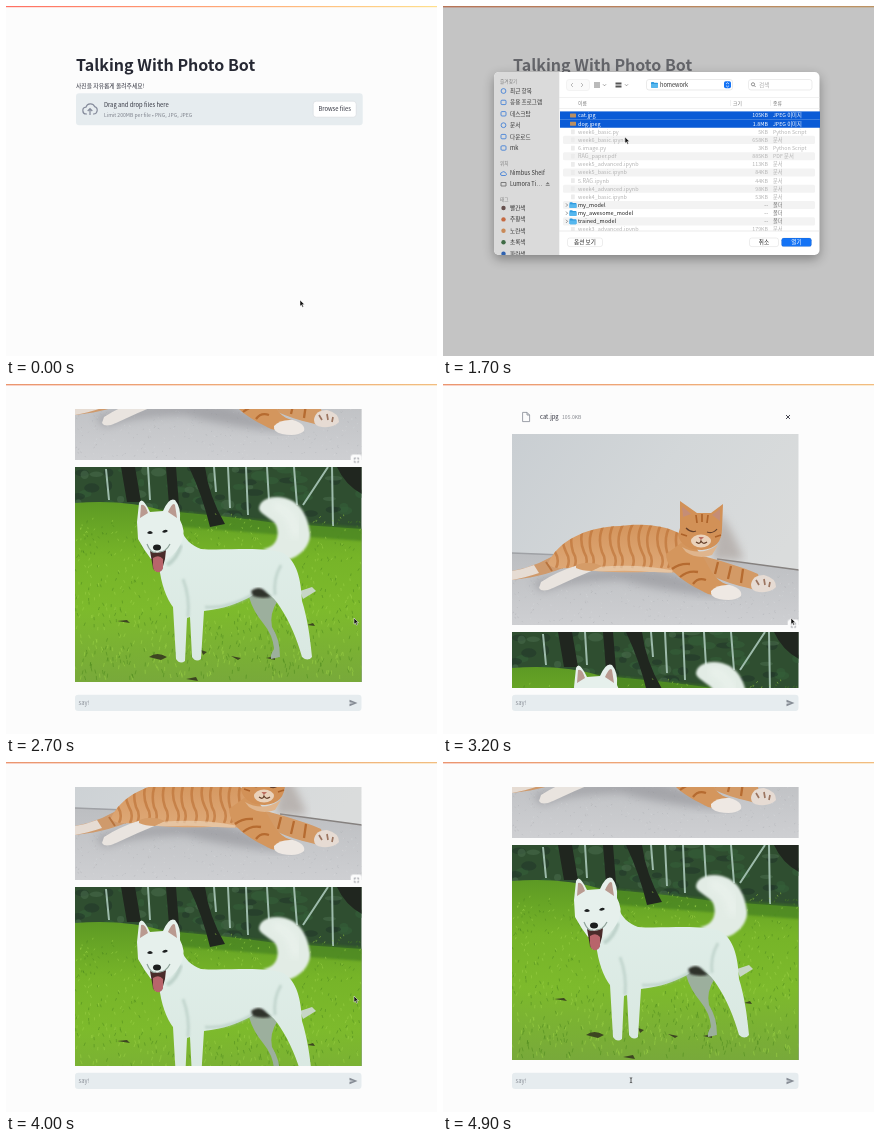
These frames come from a looping animation (431 px wide and 350 px high, 5000 ms). An HTML page:

```html
<!DOCTYPE html>
<html>
<head>
<meta charset="utf-8">
<title>Photo upload demo</title>
<style>
html, body { margin: 0; width: 100%; height: 100%; overflow: hidden; background: #fcfcfc; }
svg { display: block; width: 100%; height: 100%; }
text { font-family: "Noto Sans CJK KR", "Noto Sans CJK JP", "Open Sans", sans-serif; white-space: pre; }
.anim { animation: 5s step-end infinite; }

#page { animation-name: scroll; }
@keyframes scroll {
  0%, 48% { transform: translateY(0); }
  50% { transform: translateY(-90px); }
  52% { transform: translateY(-220px); }
  54%, 60% { transform: translateY(-282px); }
  62% { transform: translateY(-225px); }
  64% { transform: translateY(-117px); }
  66% { transform: translateY(-40px); }
  68%, 70% { transform: translateY(0); }
  72% { transform: translateY(-18px); }
  74% { transform: translateY(-55px); }
  76% { transform: translateY(-125px); }
  78% { transform: translateY(-195px); }
  80% { transform: translateY(-240px); }
  82% { transform: translateY(-264px); }
  84% { transform: translateY(-276px); }
  86%, 100% { transform: translateY(-282px); }
}

#top { animation-name: nudge; }
@keyframes nudge { 0% { transform: none; } 44%, 100% { transform: translateX(-1px); } }

#title { animation-name: pale; }
@keyframes pale { 0% { opacity: 1; } 16% { opacity: .58; } 38%, 100% { opacity: 1; } }

#browse { animation-name: hover; }
@keyframes hover {
  0% { stroke: #d5d9dd; color: #31333f; }
  12% { stroke: #ff4b4b; color: #ff4b4b; }
  16%, 100% { stroke: #d5d9dd; color: #31333f; }
}

#dialog { animation-name: dialog; }
@keyframes dialog { 0% { opacity: 0; } 16% { opacity: 1; } 38%, 100% { opacity: 0; } }
#pick1 { animation-name: pick1; }
@keyframes pick1 { 0% { opacity: 0; } 28%, 100% { opacity: 1; } }
#pick2 { animation-name: pick2; }
@keyframes pick2 { 0% { opacity: 0; } 32%, 100% { opacity: 1; } }

#files { animation-name: files; }
@keyframes files { 0% { opacity: 0; } 42%, 100% { opacity: 1; } }
.loaded { animation-name: loaded; }
@keyframes loaded { 0% { opacity: 0; } 44%, 100% { opacity: 1; } }
#warm { animation-name: warm; }
@keyframes warm { 0% { opacity: 0; } 26%, 100% { opacity: 1; } }

#zoomCat { animation-name: zoomCat; }
@keyframes zoomCat { 0% { opacity: 0; } 44% { opacity: 1; } 52% { opacity: 0; } 66% { opacity: 1; } 76%, 100% { opacity: 0; } }
#zoomDog { animation-name: zoomDog; }
@keyframes zoomDog { 0% { opacity: 0; } 52% { opacity: 1; } 66% { opacity: 0; } 76% { opacity: 1; } 92%, 100% { opacity: 0; } }

#arrow { animation-name: point, arrow; }
@keyframes point {
  0% { transform: translate(294px, 294px); animation-timing-function: steps(6); }
  12%, 22% { transform: translate(329px, 103px); animation-timing-function: steps(3); }
  28% { transform: translate(180px, 110px); }
  32% { transform: translate(181px, 118px); }
  34% { transform: translate(182px, 131px); animation-timing-function: steps(2); }
  38% { transform: translate(351px, 234px); }
  40% { transform: translate(348px, 234px); }
  86% { transform: translate(348px, 234px); animation-timing-function: steps(5); }
  96%, 100% { transform: translate(205px, 329px); }
}
@keyframes arrow { 0% { opacity: 1; } 98%, 100% { opacity: 0; } }
#beam { animation-name: beam; }
@keyframes beam { 0% { opacity: 0; } 98%, 100% { opacity: 1; } }
</style>
</head>
<body>
<svg viewBox="0 0 431 350" preserveAspectRatio="none">
  <defs>
    <linearGradient id="bar"><stop stop-color="#ff6f62"/><stop offset="1" stop-color="#ffdf8c"/></linearGradient>
    <linearGradient id="bar2"><stop stop-color="#ea966f"/><stop offset="1" stop-color="#f2bd80"/></linearGradient>
    <linearGradient id="wall" x2="1" y2=".5"><stop stop-color="#c9ced2"/><stop offset=".5" stop-color="#d3d7d9"/><stop offset="1" stop-color="#dadcdc"/></linearGradient>
    <linearGradient id="floor" x2="0" y2="1"><stop stop-color="#bcbec1"/><stop offset="1" stop-color="#cecfd2"/></linearGradient>
    <linearGradient id="fur" x2="0" y2="1"><stop stop-color="#d3935a"/><stop offset="1" stop-color="#e0ac7c"/></linearGradient>
    <linearGradient id="lawn" x2="0" y2="1"><stop stop-color="#5d9a24"/><stop offset=".3" stop-color="#76b428"/><stop offset=".6" stop-color="#7dba2c"/><stop offset="1" stop-color="#78a93a"/></linearGradient>
    <linearGradient id="coat" x2="0" y2="1"><stop stop-color="#e0eee9"/><stop offset="1" stop-color="#d9e8e1"/></linearGradient>
    <clipPath id="catBox"><rect width="286.5" height="191"/></clipPath>
    <clipPath id="dogBox"><rect width="286.5" height="215"/></clipPath>
    <clipPath id="body"><path d="M36 129C46 108 72 93 108 92C140 88 160 94 172 102L196 128C188 142 160 138 135 138C110 139 80 138 62 134C50 134 40 136 36 129Z"/></clipPath>
    <clipPath id="panel"><rect x="51" y="66" width="325.5" height="183" rx="5"/></clipPath>
    <clipPath id="list"><rect x="116" y="103" width="261" height="122"/></clipPath>
    <filter id="soft"><feGaussianBlur stdDeviation="4"/></filter>
    <filter id="fuzz"><feGaussianBlur stdDeviation=".8"/></filter>
    <filter id="shadow" x="-20%" y="-20%" width="140%" height="140%"><feGaussianBlur stdDeviation="6"/></filter>
    <g id="zoom">
      <rect width="11" height="11" rx="2.5" fill="#fcfcfc"/>
      <path d="M3.7 5V3.7H5M6.4 3.7H7.7V5M7.7 6.4V7.7H6.4M5 7.7H3.7V6.4" fill="none" stroke="#666a73" stroke-width=".7"/>
    </g>
    <g id="doc" fill="none" stroke="#858994" stroke-width=".8"><path d="M-3.4-4.6H1L3.6-2V4.6H-3.4ZM1-4.6V-2H3.6"/></g>
    <path id="cross" d="M-2-2L2 2M2-2L-2 2" stroke="#31333f" stroke-width=".9"/>
    <g id="folder"><path d="M0 .8Q0 0 .8 0H2.6L3.4 .8H6.2Q7 .8 7 1.6V5Q7 5.8 6.2 5.8H.8Q0 5.8 0 5Z" fill="#2f9be0"/><path d="M0 2H7V5Q7 5.8 6.2 5.8H.8Q0 5.8 0 5Z" fill="#56b7ee"/></g>
  </defs>

  <rect width="431" height="350" fill="#fcfcfc"/>

  <g id="page" class="anim">
    <g id="top" class="anim">
      <text id="title" class="anim" x="70" y="65" font-size="16" font-weight="700" fill="#262833">Talking With Photo Bot</text>
      <text x="70" y="82.3" font-size="5.8" font-weight="500" fill="#31333f">사진을 자유롭게 올려주세요!</text>
      <rect x="70" y="87.3" width="286.7" height="32" rx="3.2" fill="#e6ecef"/>
      <path d="M81 108H80.5A3.4 3.4 0 0 1 80 101.2A4.6 4.6 0 0 1 88.6 100.6A3.8 3.8 0 0 1 87.6 108H87M84 109V102.7M81.7 105L84 102.6L86.3 105" fill="none" stroke="#858b9b" stroke-width="1.2"/>
      <text x="98" y="101.2" font-size="5.83" fill="#31333f">Drag and drop files here</text>
      <text x="98" y="111.2" font-size="5.1" fill="#7d818b">Limit 200MB per file • PNG, JPG, JPEG</text>
      <g id="browse" class="anim">
        <rect x="307.2" y="95.2" width="43" height="16" rx="3" fill="#fff" stroke-width=".6"/>
        <text x="328.7" y="105.2" font-size="5.83" text-anchor="middle" fill="currentColor" stroke="none">Browse files</text>
      </g>
    </g>

    <g id="files" class="anim"></g>

    <g class="anim loaded">
      <g transform="translate(69 167)" clip-path="url(#catBox)">
        <rect width="287" height="191" fill="url(#wall)"/>
        <path d="M0 119L60 121L215 127L287 136V191H0Z" fill="url(#floor)"/>
        <g id="specks" fill="none" stroke-width=".8"></g>
        <path d="M0 119L50 121" stroke="#9fa1a5" stroke-width="1.5"/>
        <path d="M205 125L287 136" stroke="#85817f" stroke-width="1.6"/>
        <path d="M207 78Q222 98 232 126L200 126Z" fill="#a49a94" opacity=".6" filter="url(#soft)"/>
        <path d="M20 148Q90 130 150 136Q190 148 225 164Q150 158 110 146Q60 146 30 158Z" fill="#86868c" opacity=".5" filter="url(#soft)"/>
        <path d="M0 137Q28 132 50 116L64 128Q38 142 0 146Z" fill="#cf9a6c"/>
        <path d="M0 137Q12 135 22 131L27 139Q12 144 0 146Z" fill="#e6dcd3"/>
        <path d="M34 128L40 137M44 122L51 134" stroke="#b8743e" stroke-width="2"/>
        <g clip-path="url(#body)">
          <rect x="30" y="85" width="175" height="60" fill="url(#fur)"/>
          <g id="stripes" fill="none" stroke="#bb6f33" stroke-width="2.6" opacity=".6"></g>
          <path d="M60 138Q120 130 160 139" stroke="#ead0b4" stroke-width="5" fill="none" opacity=".7"/>
        </g>
        <path d="M29 148Q44 138 66 131L84 135Q62 144 41 154Q30 159 27 154Z" fill="#e9e4df"/>
        <path d="M64 131Q78 126 90 132L80 137Q70 137 64 134Z" fill="#d59c68"/>
        <path d="M184 120C205 126 228 132 246 140L250 157C232 154 205 146 188 136Z" fill="#d39a66"/>
        <path d="M154 120C155 138 172 148 196 160L214 164L220 152C206 149 200 140 193 126L176 104Z" fill="#d4965d"/>
        <path d="M160 135Q168 129 178 130M168 143Q176 136 186 138M181 150Q186 143 194 146M206 128L203 140M219 132L216 145M231 135L229 149" fill="none" stroke="#b66b30" stroke-width="2.3"/>
        <path d="M199 157Q205 150 218 151Q231 155 229 162Q222 168 207 165Q198 163 199 157Z" fill="#eee8e3"/>
        <path d="M239 151Q240 141 252 141Q264 144 264 153Q259 159 247 158Q239 157 239 151Z" fill="#e6dbd3"/>
        <path d="M244 146l3 5M252 145l1 6M258 148l-1 5" stroke="#9c7560" stroke-width="1.7"/>
        <path d="M168 94L168 67L185 79L199 79L211 70L210 95Q210 114 190 116Q170 116 166 101Z" fill="#d29157"/>
        <path d="M171 83L170 72L179 80ZM200 81L208 75L208 87Z" fill="#c58d76"/>
        <path d="M184 81l1 8M190 80v8M196 81l-1 8M169 100l6 2M209 101l-6 2" stroke="#ad6229" stroke-width="1.7"/>
        <ellipse cx="189" cy="107" rx="10" ry="6.5" fill="#ead2bb"/>
        <path d="M174 94Q179 99 184 97M195 98Q201 100 205 95M184 108Q188 111 189 107Q191 111 195 108" fill="none" stroke="#66402a" stroke-width="1.2"/>
        <path d="M186.5 103H192L189 106Z" fill="#bd6f60"/>
        <path d="M170 113Q188 123 206 111L200 121Q186 126 174 118Z" fill="#dfb58d"/>
      </g>
      <g transform="translate(69 365)" clip-path="url(#dogBox)">
        <rect width="287" height="215" fill="#2f4e30"/>
        <g id="leaves"></g>
        <path d="M0 36Q50 32 90 44Q160 50 200 56L287 62V215H0Z" fill="url(#lawn)"/>
        <path d="M85 42L180 52L287 60V74Q180 66 85 58Z" fill="#417a22" opacity=".6" filter="url(#fuzz)"/>
        <path d="M114 0H130Q134 30 150 57L135 60Q128 30 114 0ZM46 0H60L66 35H52ZM91 0H101L104 38H94ZM262 0H287V27Q270 18 262 0Z" fill="#20261f"/>
        <path d="M31 2L34 33M73 0L75 33M139 0L141 25M153 0L155 41M171 0L173 48M192 0L194 34M219 0L222 38M253 0L228 38M257 0L258 59" fill="none" stroke="#9dbbab" stroke-width="2"/>
        <g id="grass" fill="none" stroke-width=".9"></g>
        <path d="M74 190q8-6 18 0l-6 3zM42 154l10-1 3 3zM156 189l10 2-3 2zM111 212l10-2 2 4zM191 191l9-2v4zM126 183l6 2-4 3zM232 158l6-2 2 3zM44 146l5 1z" fill="#3d4521"/>
        <path d="M174 130Q190 118 203 133Q194 147 197 160Q205 172 205 190L196 192Q195 188 199 182Q198 168 188 156Q178 144 174 130Z" fill="#9caf9d"/>
        <path d="M225 124l12-4 4 4-13 8z" fill="#c7d6c5"/>
        <path d="M184 42C184 32 198 28 210 31C226 35 233 50 235 66C236 80 222 92 210 93L188 82C202 80 205 68 201 58C198 52 186 48 184 42Z" fill="#e2ece5" filter="url(#fuzz)"/>
        <path d="M198 38Q220 44 221 70" fill="none" stroke="#f3f8f4" stroke-width="9" opacity=".5" filter="url(#soft)"/>
        <path d="M84 98C86 118 92 132 98 140L101 192Q105 198 110 194L112 151L115 150L117 190Q121 196 126 192L129 144C148 142 166 136 178 128C190 122 198 128 205 140C215 155 222 172 227 190Q233 195 237 190C235 168 232 150 227 134C226 112 222 94 208 86C188 79 150 84 126 82C116 78 110 73 106 62Z" fill="url(#coat)"/>
        <path d="M130 140Q156 142 180 126M113 150Q115 130 108 112M200 128Q198 112 206 98" fill="none" stroke="#a9c1b8" stroke-width="3" opacity=".5" filter="url(#fuzz)"/>
        <path d="M92 98Q102 92 106 78" fill="none" stroke="#a9c1b8" stroke-width="4" opacity=".6" filter="url(#fuzz)"/>
        <path d="M176 124q8-6 14 0l6 6q-10 2-18-1z" fill="#2f3029" filter="url(#fuzz)"/>
        <path d="M62 55L64 36Q67 28 75 45L88 44Q94 30 100 33Q106 40 105 53Q111 64 107 74Q102 86 92 92L76 92Q69 83 63 72Z" fill="#e6f0ec"/>
        <path d="M65 51L66 38Q70 36 73 46ZM93 45Q98 34 100 38L102 51Z" fill="#b99a90"/>
        <path d="M75 84Q83 88 91 83L90 92L87 103Q81 107 78 101Z" fill="#4a2b2a"/>
        <path d="M78 91Q84 87 88 92V101Q86 106 82 105Q78 104 78 98Z" fill="#b8646b"/>
        <ellipse cx="82" cy="80.5" rx="4" ry="3" fill="#1c1e1e"/>
        <path d="M72 66q3-4 6 0q-3 2-6 0M87 65q3-4 6-1q-3 3-6 1" fill="#1d2020"/>
        <path d="M72 77Q76 87 81 85M84 85Q91 85 95 77" fill="none" stroke="#8fa39a" stroke-width="1.2"/>
      </g>
      <use id="zoomCat" class="anim" href="#zoom" x="344.7" y="154.5"/>
      <use id="zoomDog" class="anim" href="#zoom" x="344.7" y="352.5"/>
    </g>
  </g>

  <rect width="431" height="25" fill="#fcfcfc"/>
  <g class="anim loaded">
    <rect y="304" width="431" height="46" fill="#fcfcfc"/>
    <rect x="69" y="310.7" width="286.5" height="16.3" rx="3.2" fill="#e6ecef"/>
    <text x="72.5" y="321" font-size="5.83" fill="#8b9098">say!</text>
    <path d="M343.5 315.7L351.5 319L343.5 322.3V319.7L348 319L343.5 318.3Z" fill="#858b94"/>
  </g>
  <rect width="431" height="1.2" fill="url(#bar)"/>
  <rect id="warm" class="anim" width="431" height="1.2" fill="url(#bar2)"/>

  <g id="dialog" class="anim">
    <rect width="431" height="350" opacity=".22"/>
    <rect x="51" y="70" width="325.5" height="183" rx="5" opacity=".35" filter="url(#shadow)"/>
    <g id="sheet" clip-path="url(#panel)"></g>
  </g>

  <path id="arrow" class="anim" d="M0 0V6.2L1.4 5L2.4 7.2L3.5 6.7L2.5 4.6H4.5Z" fill="#111" stroke="#fff" stroke-width=".5"/>
  <path id="beam" class="anim" d="M186.8 315.7Q188 315.7 188 316.5Q188 315.7 189.2 315.7M188 316.5V320M186.8 320.7Q188 320.7 188 320Q188 320.7 189.2 320.7" fill="none" stroke="#222" stroke-width=".7"/>
</svg>

<script>
const $ = id => document.getElementById(id);
// y is the middle of the line
const text = (x, y, s, size = 5.6, fill = '#333', more = '') =>
  `<text x="${x}" y="${y + size * .36}" font-size="${size}" fill="${fill}" ${more}>${s}</text>`;
const rect = (x, y, w, h, fill, rx = 0, more = '') =>
  `<rect x="${x}" y="${y}" width="${w}" height="${h}" rx="${rx}" fill="${fill}" ${more}/>`;
const line = (d, color, w = .6) => `<path d="${d}" fill="none" stroke="${color}" stroke-width="${w}"/>`;
const end = 'text-anchor="end"', mid = 'text-anchor="middle"';

const fileRow = (y, name, size, x) =>
  `<use href="#doc" x="83" y="${y}"/>` + text(97, y, name, 5.83, '#31333f') +
  text(x, y, size, 5.1, '#85888f') + `<use href="#cross" x="345" y="${y}"/>`;
$('files').innerHTML = fileRow(132, 'dog.jpeg', '1.8MB', 124) + fileRow(150, 'cat.jpg', '105.0KB', 119);

let stripes = '';
for (let x = 46; x < 190; x += 9.5) stripes += `M${x} 88q-9 14 ${x % 4 - 5} 30q5 8 1 16`;
$('stripes').innerHTML = `<path d="${stripes}"/>`;

// Seeded texture for lawn, floor and foliage
let seed = 7;
const rnd = () => (seed = seed * 16807 % 2147483647) / 2147483647;
const strokes = (n, color, top, height, lift) => {
  let d = '';
  for (let i = 0; i < n; i++) {
    const y = top + height * rnd();
    d += `M${(287 * rnd()).toFixed(1)} ${y.toFixed(1)}l${(rnd() * 3 - 1.5).toFixed(1)} -${(lift + lift * y / 60).toFixed(1)}`;
  }
  return `<path d="${d}" stroke="${color}" opacity=".6"/>`;
};
$('grass').innerHTML = strokes(500, '#4f8a1f', 54, 160, .9) + strokes(500, '#9bd046', 48, 166, .9);
$('specks').innerHTML = strokes(160, '#a9abaf', 140, 50, .2) + strokes(120, '#dadbdd', 140, 50, .2);
let leaves = '';
for (let i = 0; i < 90; i++) {
  const color = ['#22382a', '#47694a', '#35603a'][i % 3];
  leaves += `<ellipse cx="${287 * rnd()}" cy="${55 * rnd()}" rx="${3 + 7 * rnd()}" ry="${2 + 3 * rnd()}" fill="${color}" opacity=".6"/>`;
}
$('leaves').innerHTML = leaves;

// Sidebar
const blue = '#3478d6', grey = '#777';
let s = rect(51, 66, 326, 183, '#fff') + rect(51, 66, 65.3, 183, '#dadada');
[[75, '즐겨찾기'], [157, '위치'], [193, '태그']].forEach(([y, h]) => s += text(57, y, h, 4.7, '#808080', 'font-weight="500"'));
['최근 항목', '응용 프로그램', '데스크탑', '문서', '다운로드', 'mk'].forEach((name, i) => {
  const y = 85 + i * 11.4;
  s += (i % 3 ? `<rect x="58" y="${y - 2.2}" width="5" height="4.4" rx="1" fill="none" stroke="${blue}" stroke-width=".8"/>`
    : `<circle cx="60.5" cy="${y}" r="2.4" fill="none" stroke="${blue}" stroke-width=".8"/>`) + text(67, y, name);
});
s += line('M59 169.5H62.5A1.3 1.3 0 0 0 62.5 167A2 2 0 0 0 59 166.5A1.5 1.5 0 0 0 59 169.5', blue, .8) + text(67, 167, 'Nimbus Shelf') +
  line('M58 176.5H63V180H58Z', '#666', .8) + text(67, 178, 'Lumora Ti…') +
  '<path d="M102.7 178.3L104.7 176L106.7 178.3ZM102.7 179H106.7V179.7H102.7Z" fill="#777"/>';
[['빨간색', '#66504e'], ['주황색', '#c56a42'], ['노란색', '#c98a58'], ['초록색', '#3f6b45'], ['파란색', '#2f62b0']].forEach(([name, c], i) => {
  const y = 202 + i * 11.4;
  s += `<circle cx="60.5" cy="${y}" r="2.2" fill="${c}"/>` + text(67, y, name);
});

// Toolbar
s += rect(123.5, 73.5, 23, 11, '#fafafa', 2.5, 'stroke="#e8e8e8" stroke-width=".5"') +
  line('M130 77L128 79L130 81M138 77L140 79L138 81', '#aaa', .8) +
  line('M151 77H157M151 79H157M151 81H157', '#555', .8) + line('M160 78.3L161.5 79.8L163 78.3M182 78.3L183.5 79.8L185 78.3', '#777', .7) +
  line('M172.5 77.5H178.5M172.5 80.5H178.5', '#555', 1.8) +
  rect(203.5, 73.5, 86, 10.5, '#fff', 2.5, 'stroke="#dcdcdc" stroke-width=".6"') +
  '<use href="#folder" x="208" y="76"/>' + text(217, 78.8, 'homework') +
  rect(281, 75.3, 7, 7, '#1473f5', 1.7) + line('M283 78L284.5 76.7L286 78M283 79.7L284.5 81L286 79.7', '#fff', .7) +
  rect(305.5, 73.5, 63.5, 10.5, '#fff', 2.5, 'stroke="#e0e0e0" stroke-width=".6"') +
  '<circle cx="310" cy="78.3" r="1.6" fill="none" stroke="#666" stroke-width=".7"/>' + line('M311.2 79.5L312.6 81', '#666', .7) +
  text(316, 78.8, '검색', 5.6, '#aaa') +
  line('M116 91.5H377M116 102.5H377M287.5 94V100M327.5 94V100', '#e3e3e3', .5) +
  text(135, 97, '이름', 4.8, grey) + text(290, 97, '크기', 4.8, grey) + text(330, 97, '종류', 4.8, grey);

// File list
const py = 'Python Script', doc = '문서', dir = '폴더', jpeg = 'JPEG 이미지';
const rows = [
  ['cat.jpg', '105KB', jpeg], ['dog.jpeg', '1.8MB', jpeg],
  ['week6_basic.py', '5KB', py], ['week6_basic.ipynb', '658KB', doc], ['6.image.py', '3KB', py],
  ['RAG_paper.pdf', '885KB', 'PDF 문서'], ['week5_advanced.ipynb', '113KB', doc], ['week5_basic.ipynb', '84KB', doc],
  ['5.RAG.ipynb', '44KB', doc], ['week4_advanced.ipynb', '98KB', doc], ['week4_basic.ipynb', '53KB', doc],
  ['my_model', '--', dir], ['my_awesome_model', '--', dir], ['trained_model', '--', dir],
  ['week3_advanced.ipynb', '179KB', doc]
];
const rowY = i => 109.5 + i * 8.14;
const cells = ([name, size, kind], y, color, soft = color) =>
  text(135, y, name, 5.5, color) + text(325, y, size, 5.3, soft, end) + text(330, y, kind, 5.3, soft);
const thumb = y => rect(127, y - 2, 6, 4, '#b98e62', .4);
let list = '';
rows.forEach((r, i) => {
  const y = rowY(i), folder = r[2] === dir;
  if (i % 2) list += rect(120, y - 4.07, 252, 8.14, '#f3f3f3', 1.5);
  list += folder || i < 2 ? cells(r, y, '#222', '#777') : cells(r, y, '#b4b4b4');
  if (folder) list += `<use href="#folder" x="126.5" y="${y - 2.9}"/>` + line(`M123 ${y - 1.6}l1.6 1.6l-1.6 1.6`, '#666', .7);
  else if (i < 2) list += thumb(y);
  else list += rect(128, y - 2.4, 3.8, 4.8, '#ececec', .4);
});
for (let i = 0; i < 2; i++) {
  const y = rowY(i);
  list += `<g id="pick${i + 1}" class="anim">` + rect(117, y - 4.1, 260, 8.2, '#0a5bd6') + thumb(y) + cells(rows[i], y, '#fff') + '</g>';
}
s += `<g clip-path="url(#list)">${list}</g>`;

// Buttons
const button = (x, w, label, fill, color) =>
  rect(x, 232, w, 8.6, fill, 2.2, 'stroke="#000" stroke-opacity=".14" stroke-width=".5"') +
  text(x + w / 2, 236.3, label, 5.6, color, mid + ' font-weight="500"');
s += line('M116 225H377', '#dedede', .6) + button(124.5, 35, '옵션 보기', '#fff', '#222') +
  button(306.5, 29, '취소', '#fff', '#222') + button(338.5, 30, '열기', '#1473f5', '#fff');
$('sheet').innerHTML = s;
</script>
</body>
</html>
```
